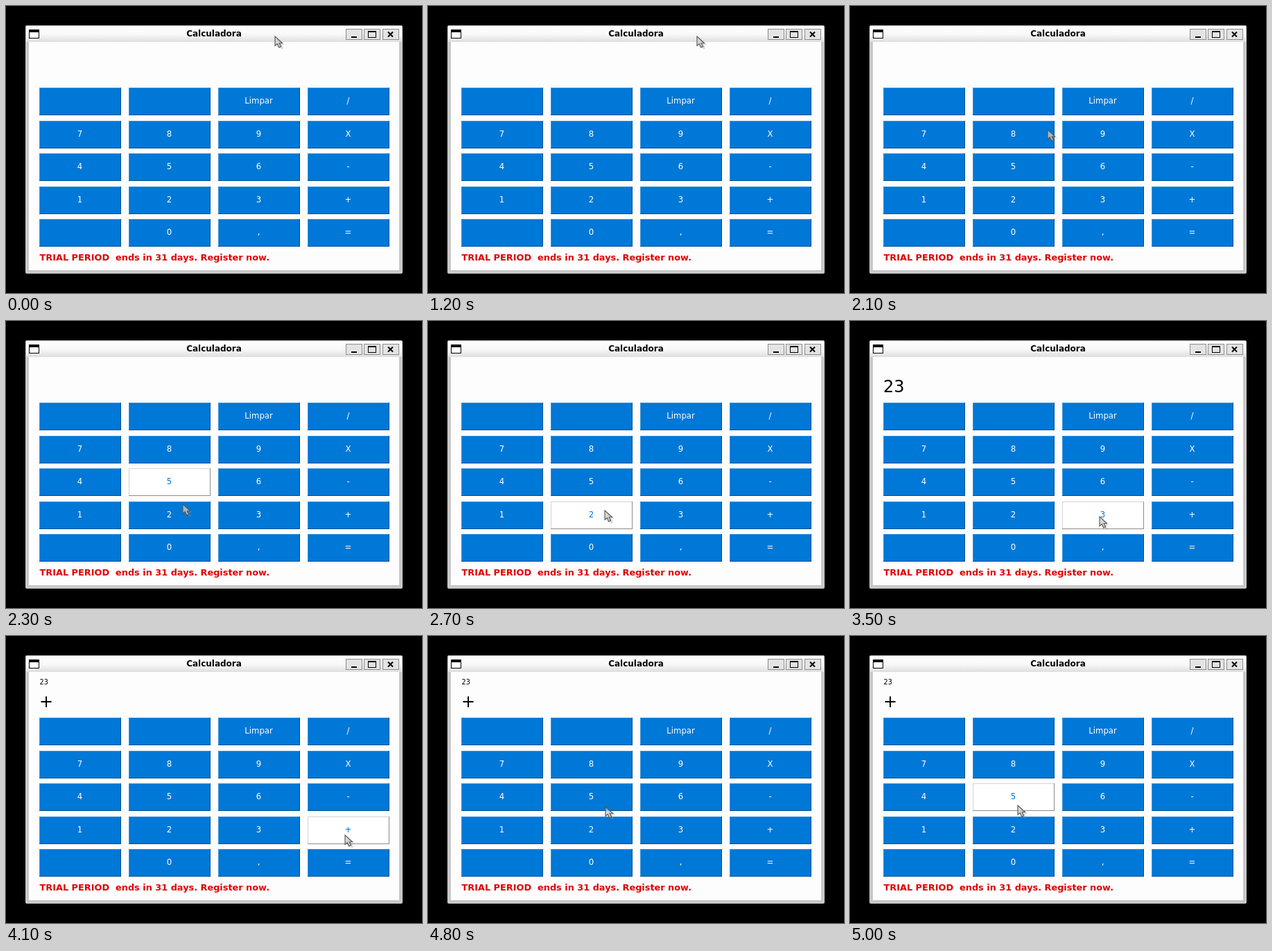
These frames come from a looping animation (600 px wide and 415 px high, 5.1 s). An HTML page with a canvas:

```html
<!DOCTYPE html>
<html lang="pt">
<head>
<meta charset="utf-8">
<title>Calculadora</title>
<style>
html, body { margin: 0; width: 100%; height: 100%; overflow: hidden; background: #000; }
canvas { display: block; }
</style>
</head>
<body>
<canvas id="stage" width="600" height="415"></canvas>
<script>
const ctx = document.getElementById('stage').getContext('2d');
const LOOP = 5100, STEP = 100;
const BLUE = '#0078d7';
const FONT = '"DejaVu Sans", sans-serif';
const LABELS = ['', '', 'Limpar', '/', '7', '8', '9', 'X', '4', '5', '6', '-',
                '1', '2', '3', '+', '', '0', ',', '='];
const KEYS = LABELS.map((label, i) => ({
  label,
  x: Math.round(48 + 128.9 * (i % 4)),
  y: Math.round(118 + 47.6 * Math.floor(i / 4)),
  w: 118, h: 40
}));

// Pointer path: time, x, y
const PATH = [
  [0, 388, 44], [1900, 388, 44], [2000, 345, 105], [2100, 285, 179],
  [2200, 262, 237], [2300, 255, 265], [2400, 255, 274], [3100, 255, 274],
  [3200, 292, 279], [3300, 344, 283], [3400, 360, 283], [3700, 360, 283],
  [3800, 405, 285], [3900, 465, 288], [4000, 489, 288], [4400, 489, 288],
  [4500, 462, 284], [4600, 390, 270], [4700, 310, 256], [4800, 256, 247],
  [4900, 242, 245], [5100, 242, 245]
];

function pointerAt(t) {
  const next = Math.max(1, PATH.findIndex(p => p[0] >= t));
  const [t0, x0, y0] = PATH[next - 1], [t1, x1, y1] = PATH[next];
  const k = (t - t0) / (t1 - t0);
  return { x: x0 + (x1 - x0) * k, y: y0 + (y1 - y0) * k };
}

function rect(x, y, w, h, fill) {
  ctx.fillStyle = fill;
  ctx.fillRect(x, y, w, h);
}

function text(str, x, y, size, fill, align = 'left', weight = 'normal') {
  ctx.font = `${weight} ${size}px ${FONT}`;
  ctx.textAlign = align;
  ctx.fillStyle = fill;
  ctx.fillText(str, x, y);
}

function frame(x, y, w, h, color) {
  ctx.strokeStyle = color;
  ctx.lineWidth = 1;
  ctx.strokeRect(x + .5, y + .5, w - 1, h - 1);
}

function titleButton(x) {
  rect(x, 33, 24, 16, '#e4e4e4');
  frame(x, 33, 24, 16, '#8c8c8c');
}

function drawWindow() {
  rect(0, 0, 600, 415, '#000');
  ctx.fillStyle = '#c8c8c8';
  ctx.beginPath();
  ctx.roundRect(28, 28, 544, 359, 2);
  ctx.fill();
  const shade = ctx.createLinearGradient(0, 28, 0, 52);
  shade.addColorStop(0, '#fff');
  shade.addColorStop(.55, '#f8f8f8');
  shade.addColorStop(1, '#dedede');
  rect(29, 29, 542, 23, shade);
  rect(33, 52, 534, 330, '#fefdfe');

  rect(33, 34, 15, 13, '#000');
  rect(34, 38, 13, 8, '#fff');
  text('Calculadora', 300, 44, 12, '#000', 'center', 'bold');

  [490, 516, 543].forEach(titleButton);
  rect(498, 44, 8, 2, '#000');
  rect(522, 36, 12, 10, '#000');
  rect(523, 38, 10, 7, '#e4e4e4');
  ctx.strokeStyle = '#000';
  ctx.lineWidth = 2;
  ctx.beginPath();
  ctx.moveTo(551, 37.5); ctx.lineTo(558, 44.5);
  ctx.moveTo(558, 37.5); ctx.lineTo(551, 44.5);
  ctx.stroke();

  text('TRIAL PERIOD\u00a0 ends in 31 days. Register now.', 48.5, 368, 12.87, '#e00000', 'left', 'bold');
}

function drawKey({ label, x, y, w, h }, hover) {
  rect(x, y, w, h, hover ? '#fff' : BLUE);
  rect(x, y, w, 1, hover ? '#d4d4d4' : '#3c96de');
  rect(x, y, 1, h, hover ? '#d4d4d4' : '#3c96de');
  rect(x, y + h - 1, w, 1, hover ? '#8c8c8c' : '#00508f');
  rect(x + w - 1, y, 1, h, hover ? '#8c8c8c' : '#00508f');
  text(label, x + w / 2 - .5, y + 23, 11.7, hover ? BLUE : '#fff', 'center');
}

function drawDisplay(t) {
  const entry = t >= 4000 ? '+' : t >= 3400 ? '23' : t >= 2800 ? '2' : '';
  if (t >= 4000) text('23', 48.5, 70, 9.7, '#000');
  text(entry, 48, 103, 24, '#000');
}

function drawPointer({ x, y }) {
  const arrow = new Path2D('M0 0V13.5L3.2 10.7L5.8 16L8.6 14.7L6.2 9.8L10.5 9.5Z');
  ctx.save();
  ctx.translate(x + 3.5, y + 2.5);
  ctx.fillStyle = 'rgba(150,150,150,.35)';
  ctx.fill(arrow);
  ctx.translate(-3.5, -2.5);
  ctx.fillStyle = 'rgba(205,205,205,.75)';
  ctx.fill(arrow);
  ctx.strokeStyle = '#555';
  ctx.lineWidth = 1.1;
  ctx.stroke(arrow);
  ctx.restore();
}

function draw(now) {
  const t = Math.floor((now % LOOP) / STEP) * STEP;
  // The highlight trails the pointer by one step.
  const touch = pointerAt(Math.max(0, t - STEP));
  drawWindow();
  for (const key of KEYS) {
    const dx = touch.x - key.x, dy = touch.y - key.y;
    drawKey(key, dx >= 0 && dx < key.w && dy >= 0 && dy < key.h);
  }
  drawDisplay(t);
  drawPointer(pointerAt(t));
}

function tick() {
  draw(performance.now());
  requestAnimationFrame(tick);
}
tick();
</script>
</body>
</html>
```
